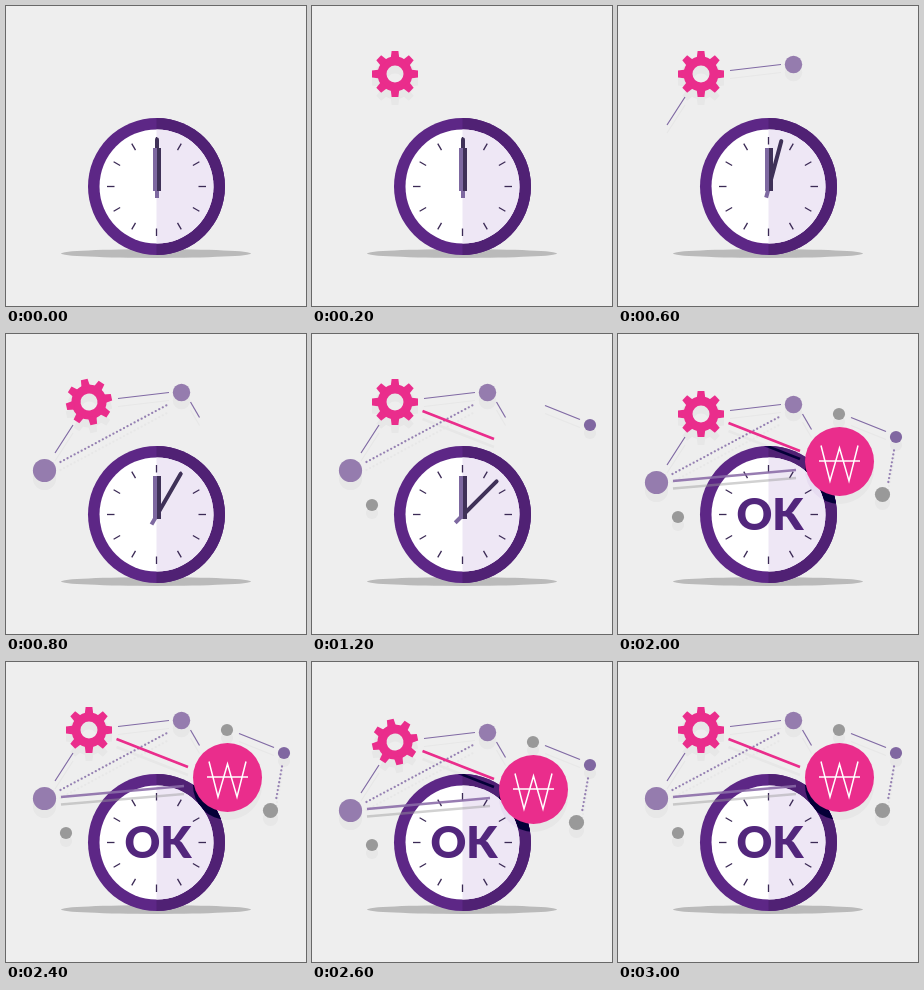
An HTML page that plays this animation: 300x300 px, repeating every 3.2 s.

```html
<!DOCTYPE html>
<html lang="en">
<head>
<meta charset="utf-8">
<title>Clock network</title>
<style>
html, body { margin: 0; width: 100%; height: 100%; overflow: hidden; background: #eee; }
svg { display: block; width: 100vw; height: 100vh; }
#shade { filter: brightness(0) invert(.7); mix-blend-mode: color-burn; }
.thin { stroke: #806aa4; stroke-width: 1.2; }
.dots { stroke: #9580b2; stroke-width: 2.3; stroke-linecap: round; stroke-dasharray: 0 4; }
.pink { fill: #ea2d8c; }
.lilac { fill: #957cae; }
.grey { fill: #999; }
#ok { font: 900 44px Lato, Montserrat, sans-serif; fill: #52267c; }
</style>
</head>
<body>
<svg viewBox="0 0 300 300">
  <rect width="300" height="300" fill="#eee"/>
  <ellipse cx="150" cy="247.5" rx="95" ry="4.4" fill="#bababa"/>
  <g transform="translate(150.5 180.5)">
    <circle r="68.5" fill="#5d2786"/>
    <path d="M0-68.5a68.5 68.5 0 0 1 0 137z" fill="#502174"/>
    <circle r="57" fill="#fff"/>
    <path d="M0-57a57 57 0 0 1 0 114z" fill="#eee7f5"/>
    <g id="ticks" stroke="#3b2a55" stroke-width="1.3"></g>
  </g>
  <g id="hands">
    <g id="minute">
      <path d="M151 181V133.5" stroke="#3f3158" stroke-width="4" stroke-linecap="round"/>
      <path d="M151 181v11" stroke="#7d68a0" stroke-width="4"/>
    </g>
    <path d="M147 142h4v43h-4z" fill="#7d68a0"/>
    <path d="M151 142h4v43h-4z" fill="#3f3158"/>
  </g>
  <text id="ok" x="152" y="196" text-anchor="middle" textLength="auto">OK</text>
  <use id="shade" href="#net"/>
  <g id="bob">
    <g data-from="7" stroke-width="2.6">
      <path d="M55 142.5L178 132" stroke="#999" stroke-opacity=".45"/>
      <path d="M55 135L178 124" stroke="#8a6ba8" stroke-opacity=".88"/>
    </g>
    <g id="net">
      <g id="gear" class="pink" data-from="1">
        <circle r="13" fill="none" stroke="#ea2d8c" stroke-width="9"/>
      </g>
      <path class="thin" data-from="3" d="M112 64.5L163 58.5M49 119L67 91"/>
      <circle class="lilac" data-from="3" cx="175.5" cy="58.5" r="8.7"/>
      <path class="thin" data-from="4" d="M184.5 68L193.5 83.5"/>
      <path class="dots" data-from="4" d="M54.5 128L163 70"/>
      <circle class="lilac" data-from="4" cx="38.5" cy="136.5" r="11.6"/>
      <path data-from="5" d="M110.5 77L182 105" stroke="#ea2d8c" stroke-width="2.5"/>
      <circle data-from="5" cx="278" cy="91" r="6.1" fill="#8067a1"/>
      <path class="thin" data-from="6" d="M233 71.5L268 85.5"/>
      <circle class="grey" data-from="6" cx="60" cy="171" r="6.1"/>
      <path class="dots" data-from="7" d="M276 104.5L270 138"/>
      <circle class="grey" data-from="7" cx="221" cy="68" r="6.1"/>
      <circle class="grey" data-from="8" cx="264.5" cy="148.5" r="7.6"/>
      <g data-from="8">
        <circle class="pink" cx="221.5" cy="115.5" r="34.5"/>
        <path d="M203 99.5L212 135L221.5 102L231 135L240 99.5M201 115h41" fill="none" stroke="#fff" stroke-width="1.5"/>
      </g>
    </g>
  </g>
</svg>
<script>
const $ = id => document.getElementById(id);
const STEP = 200, STEPS = 16;
const turned = [2, 4, 7, 9, 11, 13];
const show = (el, on) => el.setAttribute('visibility', on ? 'visible' : 'hidden');

function addPath(parent, d, angle) {
  const p = document.createElementNS('http://www.w3.org/2000/svg', 'path');
  p.setAttribute('d', d);
  p.setAttribute('transform', `rotate(${angle})`);
  parent.append(p);
}
for (let i = 0; i < 12; i++) addPath($('ticks'), 'M0-42v-7.5', i * 30);
for (let i = 0; i < 8; i++) addPath($('gear'), 'M-4.4-15L-3.4-23H3.4L4.4-15z', i * 45);

const parts = document.querySelectorAll('[data-from]');

function draw(now) {
  const k = Math.floor(now / STEP) % STEPS;
  const drop = k === 9 || k === 10 || k === 13 || k === 14 ? 12 : 0;
  parts.forEach(el => show(el, k >= el.dataset.from));
  show($('hands'), k < 10);
  show($('ok'), k >= 10);
  $('minute').setAttribute('transform', `rotate(${15 * Math.min(4, k >> 1)} 151 181)`);
  $('gear').setAttribute('transform', `translate(83 68) rotate(${turned.includes(k) ? -12 : 0})`);
  $('bob').setAttribute('transform', `translate(0 ${drop})`);
  $('shade').setAttribute('y', drop + 8);
}

const start = performance.now();
function loop() {
  draw(performance.now() - start);
  requestAnimationFrame(loop);
}
loop();
</script>
</body>
</html>
```
